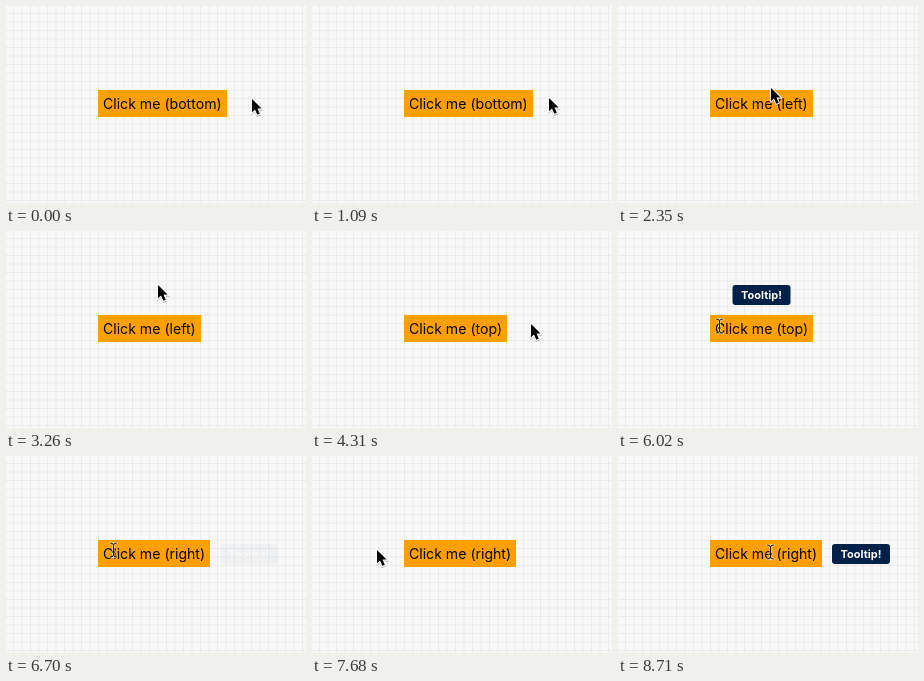
Animation, 300 px wide and 197 px high, one loop 9530 ms. Source, as an HTML page:

```html
<!DOCTYPE html>
<html lang="en">
<head>
<meta charset="utf-8">
<style>
  html, body { margin: 0; width: 100%; height: 100%; overflow: hidden; background: #f8f8f8; }
  svg { display: block; width: 300px; height: 197px; font-family: Inter, sans-serif; }
</style>
</head>
<body>
<svg viewBox="0 0 300 197">
  <defs>
    <pattern id="grid" x="7" y="7" width="8.5" height="8.5" patternUnits="userSpaceOnUse">
      <path d="M.5 0V8.5M0 .5H8.5" stroke="#ebebeb"/>
    </pattern>
    <filter id="shadow" x="-50%" y="-50%" width="200%" height="200%">
      <feDropShadow dx="0" dy="1" stdDeviation=".7" flood-opacity=".35"/>
    </filter>
    <path id="beamShape" d="M-3-7Q0-7 0-5Q0-7 3-7M0-5V5M-3 7Q0 7 0 5Q0 7 3 7M-1.5 2H1.5"/>
  </defs>
  <rect width="300" height="197" fill="url(#grid)"/>
  <rect id="button" x="92" y="84" height="27" fill="#ff9f00"/>
  <text id="label" x="97" y="103" font-size="14.1"></text>
  <g id="tip">
    <rect width="58" height="20" rx="3" fill="#002147"/>
    <text x="29" y="14" font-size="11" font-weight="700" fill="#fff" text-anchor="middle">Tooltip!</text>
  </g>
  <path id="arrow" d="M0 0V13.2L3 10.5 5.3 15.8 7.8 14.7 5.5 9.5H9.6Z" stroke="#fff" stroke-width="1.8" paint-order="stroke" filter="url(#shadow)"/>
  <g id="beam" fill="none" stroke-linecap="round">
    <use href="#beamShape" stroke="#fff" stroke-width="2.4" stroke-opacity=".6"/>
    <use href="#beamShape" stroke="#111"/>
  </g>
</svg>
<script>
const LOOP = 9530, FADE_IN = 500, FADE_OUT = 300, STEP = 10;
const LEFT = 92, TOP = 84, HEIGHT = 27, PAD = 5, GAP = 10, TIP_W = 58, TIP_H = 20;
const [button, label, tip, arrow, beam] =
  ['button', 'label', 'tip', 'arrow', 'beam'].map(id => document.getElementById(id));
const smooth = v => v * v * (3 - 2 * v);

const demos = [[0, 'bottom'], [2080, 'left'], [4270, 'top'], [6450, 'right']]
  .map(([start, side]) => {
    const text = `Click me (${side})`;
    label.textContent = text;
    const width = Math.round(label.getComputedTextLength()) + 2 * PAD;
    return { start, side, text, width };
  });
const demoAt = t => demos.findLast(d => d.start <= t);

// Where the pointer comes to rest: time, x, y
const stops = [
  [0, 246, 93], [300, 246, 93], [640, 196, 97], [1000, 237, 92], [1270, 237, 92],
  [1700, 157, 97], [2100, 154, 39], [2520, 153, 106], [3260, 152, 54], [3500, 152, 54],
  [3800, 170, 92], [4200, 219, 93], [4400, 219, 93], [4800, 164, 97], [5200, 203, 96],
  [5400, 203, 96], [6200, 86, 95], [6480, 59, 94], [6860, 136, 94], [7300, 65, 94],
  [8100, 65, 95], [8320, 152, 96], [LOOP, 152, 96]
];

function pointerAt(t) {
  const next = stops.findIndex(s => s[0] > t);
  const [t0, x0, y0] = stops[next - 1], [t1, x1, y1] = stops[next];
  const k = smooth((t - t0) / (t1 - t0));
  return [x0 + (x1 - x0) * k, y0 + (y1 - y0) * k];
}

function isOver([x, y], width, inset = 0) {
  return x >= LEFT + inset && x <= LEFT + width - inset &&
    y >= TOP + inset && y <= TOP + HEIGHT - inset;
}

// Fade progress over the loop, rising while the pointer is on the button
const fades = [];
for (let t = 0, fade = 0; t < LOOP; t += STEP) {
  const change = isOver(pointerAt(t), demoAt(t).width) ? STEP / FADE_IN : -STEP / FADE_OUT;
  fade = Math.min(1, Math.max(0, fade + change));
  fades.push(fade);
}

function tipCorner(side, width) {
  const x = { left: LEFT - GAP - TIP_W, right: LEFT + width + GAP }[side];
  const y = { top: TOP - GAP - TIP_H, bottom: TOP + HEIGHT + GAP }[side];
  return [x ?? LEFT + (width - TIP_W) / 2, y ?? Math.ceil(TOP + (HEIGHT - TIP_H) / 2)];
}

function place(node, [x, y], visible = true) {
  node.setAttribute('transform', `translate(${x} ${y})`);
  node.style.display = visible ? '' : 'none';
}

function draw(t) {
  const { side, text, width } = demoAt(t);
  const pointer = pointerAt(t).map(Math.round);
  const overText = isOver(pointer, width, PAD);

  label.textContent = text;
  button.setAttribute('width', width);
  tip.setAttribute('opacity', smooth(fades[Math.floor(t / STEP)]));
  place(tip, tipCorner(side, width));
  place(arrow, pointer, !overText);
  place(beam, [pointer[0] + .5, pointer[1]], overText);
}

function frame() {
  draw(performance.now() % LOOP);
  requestAnimationFrame(frame);
}
frame();
</script>
</body>
</html>
```
